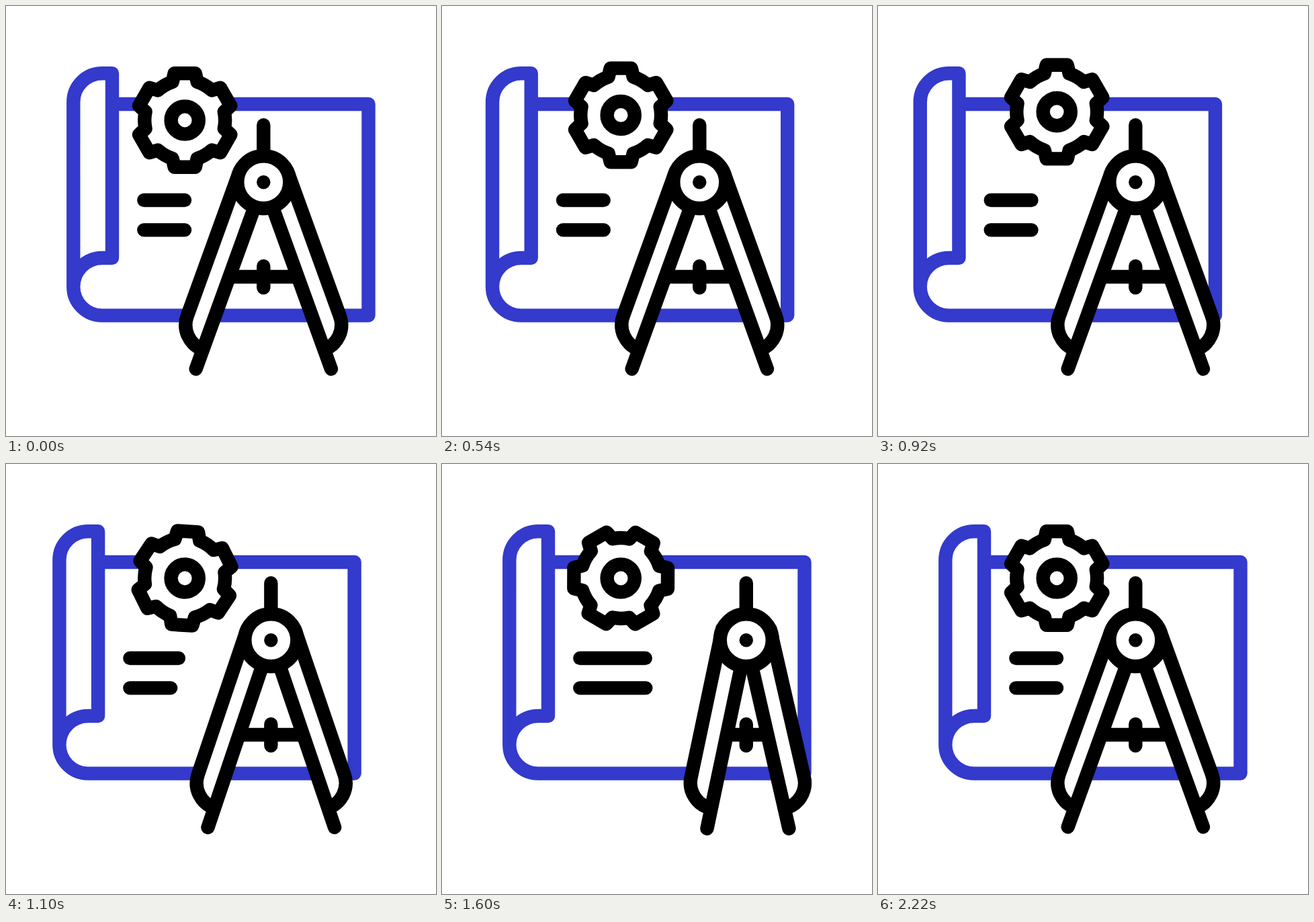
Animation, 640 px wide and 640 px high, one loop 2400 ms. Source, as an HTML page:

```html
<!DOCTYPE html>
<html lang="en">
<head>
<meta charset="utf-8">
<title>Blueprint and compass</title>
<style>
html, body { margin: 0; height: 100%; overflow: hidden; background: #fff; }
svg { display: block; width: 100vw; height: 100vh; }
.ink { fill: none; stroke: #000; stroke-width: 20.4; stroke-linecap: round; stroke-linejoin: round; }
.blue { stroke: #333acc; }
.solid { fill: #fff; }
</style>
</head>
<body>
<svg viewBox="0 0 640 640" class="ink">
  <g id="paper">
    <path class="blue" d="M158 146H539.5V460.6H143A42.7 42.7 0 0 1 100.3 418V143A42.7 42.7 0 0 1 143 100.3H158V375H143A42.7 42.7 0 0 0 100.3 418"/>
    <path id="line1"/>
    <path id="line2"/>
  </g>
  <g id="gear">
    <path id="rim" class="solid"/>
    <circle r="20.6"/>
  </g>
  <g id="compass">
    <path d="M0 -85V-39M-50 140.8H50M0 125V157"/>
    <path id="left" class="solid"/>
    <path id="right" class="solid"/>
    <circle class="solid" r="39"/>
    <circle r="10.2" fill="#000" stroke="none"/>
  </g>
</svg>
<script>
const LOOP = 2400;
const $ = id => document.getElementById(id);
const set = (id, name, value) => $(id).setAttribute(name, value);

// Smooth 0 → 1 between two times
const ease = (t, from, to) => {
  const p = Math.min(1, Math.max(0, (t - from) / (to - from)));
  return p * p * (3 - 2 * p);
};
// Rises from a to b, stays until c, falls back by d
const pulse = (t, a, b, c, d) => ease(t, a, b) - ease(t, c, d);

function gearPath(teeth) {
  const tooth = [[-18.5, -57], [-15.5, -69.8], [15.5, -69.8], [18.5, -57]];
  let d = '';
  for (let i = 0; i < teeth; i++) {
    const a = i * 2 * Math.PI / teeth, c = Math.cos(a), s = Math.sin(a);
    tooth.forEach(([x, y], k) => {
      const command = k ? 'L' : i ? 'A60 60 0 0 1 ' : 'M';
      d += `${command}${x * c - y * s} ${x * s + y * c}`;
    });
  }
  return d + 'A60 60 0 0 1 -18.5 -57Z';
}

set('rim', 'd', gearPath(6));
for (const leg of ['left', 'right']) set(leg, 'd', 'M-39 0V226A39 39 0 0 0 0 265V295.6V0');

function draw(t) {
  set('paper', 'transform', `translate(${-42 * pulse(t, 200, 800, 800, 1400)} 0)`);
  set('line1', 'd', `M205.3 289H${266 + 74 * pulse(t, 1000, 1400, 1400, 1800)}`);
  set('line2', 'd', `M205.3 333.4H${266 + 74 * pulse(t, 1400, 1800, 1800, 2200)}`);

  const hop = pulse(t, 200, 400, 400, 600) + pulse(t, 600, 800, 800, 1000);
  set('gear', 'transform', `translate(266.2 ${170 - 36 * hop}) rotate(${180 * ease(t, 1000, 2200)})`);

  const shift = pulse(t, 1000, 1400, 1800, 2200);
  set('compass', 'transform', `translate(${383.3 + 69.5 * shift} 262.2)`);
  set('left', 'transform', `rotate(${-8 * shift} -62 -23) rotate(19.9)`);
  set('right', 'transform', `scale(-1 1) rotate(${-7 * shift} -62 -23) rotate(19.9)`);
}

function tick() {
  draw(performance.now() % LOOP);
  requestAnimationFrame(tick);
}
tick();
</script>
</body>
</html>
```
